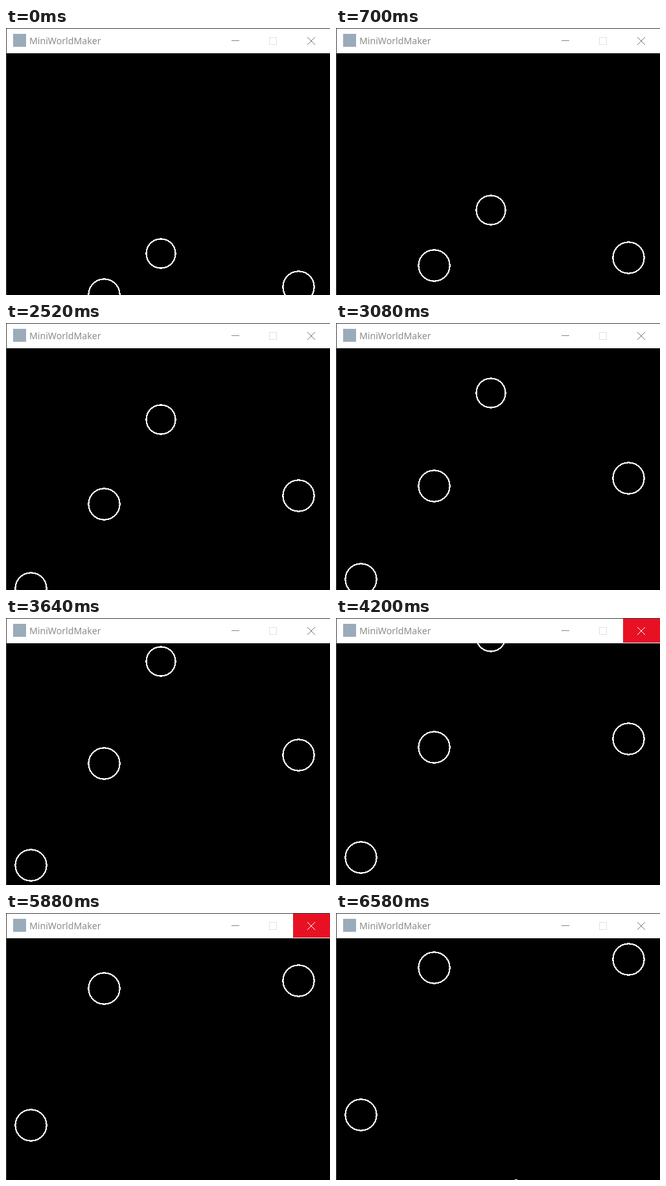
Write an HTML page with a canvas that moves like this. It is 500 by 412 pixels and loops after 6.82 s.

```html
<!DOCTYPE html>
<html lang="en">
<head>
<meta charset="utf-8">
<title>MiniWorldMaker</title>
<style>
  html, body { margin: 0; overflow: hidden; background: #000; }
  canvas { display: block; }
</style>
</head>
<body>
<canvas id="stage" width="500" height="412"></canvas>
<script>
const ctx = document.getElementById('stage').getContext('2d');
const LOOP = 6820, STEP = 140, LAST_STEP = 47;
const SCALE = 1.25; // the game board is shown enlarged
const HOVER_FROM = 3920, HOVER_TO = 6160;

// [step, game ticks passed]
const pace = [[0, 0], [5, 18], [13, 39], [22, 64], [30, 85], [38, 107], [47, 131]];

const bubbles = [
  { x: 239, y: 348, r: 24, speed: 3 },
  { x: 151.5, y: 411.5, r: 25.5, speed: 2 },
  { x: 451.5, y: 399, r: 25.5, speed: 2 },
  { x: 38.5, y: 475.25, r: 25.5, speed: 1 },
  { x: 278, y: 925.75, r: 24, speed: 3 },
];

function ticksAt(step) {
  const i = Math.max(1, pace.findIndex(([s]) => s >= step));
  const [s0, k0] = pace[i - 1], [s1, k1] = pace[i];
  return Math.round(k0 + (k1 - k0) * (step - s0) / (s1 - s0));
}

function rect(color, x, y, w, h) {
  ctx.fillStyle = color;
  ctx.fillRect(x, y, w, h);
}

// Ring of whole pixels, without antialiasing
function ring(cx, cy, r) {
  const left = Math.round(cx - r), top = Math.round(cy - r);
  for (let j = 0; j < 2 * r; j++) {
    for (let i = 0; i < 2 * r; i++) {
      const d = Math.hypot(i + 0.5 - r, j + 0.5 - r);
      if (d > r - 2.5 && d < r - 0.4) rect('#fff', left + i, top + j, 1, 1);
    }
  }
}

function line(color, ...points) {
  ctx.strokeStyle = color;
  ctx.beginPath();
  for (const [x0, y0, x1, y1] of points) {
    ctx.moveTo(x0, y0);
    ctx.lineTo(x1, y1);
  }
  ctx.stroke();
}

function titleBar(hover) {
  rect('#fff', 1, 1, 499, 38);
  rect('#404040', 0, 0, 500, 1);
  rect('#404040', 0, 0, 1, 412);
  rect('#9aabba', 11, 9, 20, 20);
  ctx.font = '14.15px "Noto Sans", "Open Sans", sans-serif';
  ctx.fillStyle = '#8a8e88';
  ctx.fillText('MiniWorldMaker', 36, 25);
  ctx.lineWidth = 1;
  line('#888', [348, 19.5, 360, 19.5]);
  ctx.strokeStyle = '#e2e2e2';
  ctx.strokeRect(406.5, 14.5, 11, 11);
  if (hover) rect('#e81123', 443, 1, 57, 37);
  line(hover ? '#fff' : '#777', [465, 14, 477, 26], [477, 14, 465, 26]);
}

function draw() {
  const time = performance.now() % LOOP;
  const ticks = ticksAt(Math.min(LAST_STEP, Math.floor(time / STEP)));
  rect('#000', 0, 0, 500, 412);
  for (const { x, y, r, speed } of bubbles) ring(x, y - ticks * speed * SCALE, r);
  titleBar(time >= HOVER_FROM && time < HOVER_TO);
  requestAnimationFrame(draw);
}
draw();
</script>
</body>
</html>
```
